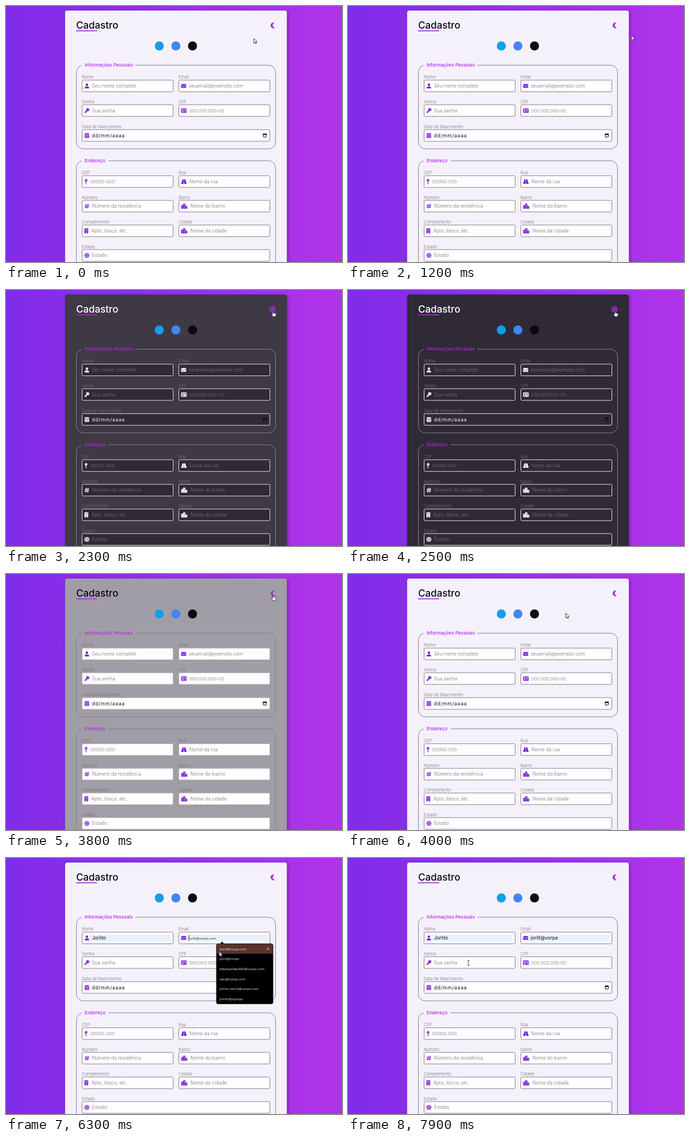
Animation of 594x452 px, one loop 8 s. Source, as an HTML page with a canvas:

```html
<!DOCTYPE html>
<html lang="pt-BR">
<head>
<meta charset="utf-8">
<title>Cadastro</title>
<style>
html, body { margin: 0; width: 100%; height: 100%; overflow: hidden; }
canvas { display: block; width: 594px; height: 452px; }
</style>
</head>
<body>
<canvas id="stage" width="594" height="452"></canvas>
<script>
const c = document.getElementById('stage').getContext('2d');
const LOOP = 8000, STEP = 100;
const DARK_AT = 2100, LIGHT_AT = 3700, FADE = 300;
const UI = 'Inter, sans-serif', SYSTEM = '"Open Sans", sans-serif';
const PURPLE = '#7a1fd8', PINK = '#ae28e0', GRAY = '#757079';
const NAME = 'Jorlito';
const MAILS = ['jorlit@vorpe.com', 'jorlit@vorpe', 'bibalxandes482@vorpe.com',
  'xqu@vorpe.com', 'jorlito.tavim@vorpe.com', 'jorlito@xqzrpp'];

// id, label, placeholder, left, width, middle, icon offset, text offset
const FIELDS = [
  ['user', 'Nome', 'Seu nome completo', 134, 162, 141.2, 9, 18],
  ['mail', 'Email', 'seuemail@exemplo.com', 305, 162, 141.2, 9, 18],
  ['key', 'Senha', 'Sua senha', 134, 162, 184.6, 9, 18],
  ['card', 'CPF', '000.000.000-00', 305, 162, 184.6, 9.5, 19],
  ['date', 'Data de Nascimento', 'dd/mm/aaaa', 134, 333, 228.6, 9, 18],
  ['pin', 'CEP', '00000-000', 134, 162, 310, 7.5, 15],
  ['road', 'Rua', 'Nome da rua', 305, 162, 310, 9.5, 19],
  ['hash', 'Número', 'Número da residência', 134, 162, 353.4, 9, 18],
  ['city', 'Bairro', 'Nome do bairro', 305, 162, 353.4, 10, 21],
  ['tower', 'Complemento', 'Apto, bloco, etc.', 134, 162, 397, 8, 17],
  ['city', 'Cidade', 'Nome da cidade', 305, 162, 397, 10, 21],
  ['globe', 'Estado', 'Estado', 134, 333, 440.4, 9, 18]
];

// Pointer path: time, x, y, shape
const PATH = [
  [0, 438, 57, arrow], [500, 438, 57, arrow], [700, 485, 92, arrow], [900, 555, 111, arrow],
  [1100, 528, 70, arrow], [1300, 474, 34, hand], [1400, 472, 37, hand], [3800, 472, 37, hand],
  [3900, 432, 51, arrow], [4000, 385, 69, arrow], [4300, 240, 121, arrow], [4500, 217, 142, beam],
  [4600, 218, 143, beam], [4800, 218, 143, beam], [4900, 220, 153, arrow], [5000, 222, 157, arrow],
  [5200, 222, 157, arrow], [5300, 225, 176, arrow], [5400, 225, 176, arrow], [5700, 343, 142, beam],
  [5900, 343, 142, beam], [6000, 352, 153, arrow], [6200, 377, 165, arrow], [6300, 377, 165, arrow],
  [6500, 388, 178, arrow], [6600, 388, 178, arrow], [7000, 318, 192, arrow], [7300, 230, 186, beam],
  [7400, 217, 185, beam], [7500, 217, 185, beam], [7700, 212, 185, beam], [7900, 213, 185, beam],
  [8000, 213, 185, beam]
];

function mix(a, b, p) {
  return `rgb(${a.map((v, i) => Math.round(v + (b[i] - v) * p))})`;
}

// CSS "ease" curve, solved by bisection
function ease(x) {
  if (x <= 0 || x >= 1) return Math.min(1, Math.max(0, x));
  const bez = (s, a, b) => 3 * s * (1 - s) ** 2 * a + 3 * s * s * (1 - s) * b + s ** 3;
  let lo = 0, hi = 1;
  for (let i = 0; i < 20; i++) {
    const mid = (lo + hi) / 2;
    if (bez(mid, .25, .25) < x) lo = mid; else hi = mid;
  }
  return bez(lo, .1, 1);
}

function box(x, y, w, h, r, fill, stroke) {
  c.beginPath();
  c.roundRect(x, y, w, h, r);
  if (fill) { c.fillStyle = fill; c.fill(); }
  if (stroke) { c.strokeStyle = stroke; c.stroke(); }
}

function disc(x, y, r, fill) {
  c.beginPath();
  c.arc(x, y, r, 0, 7);
  c.fillStyle = fill;
  c.fill();
}

function line(points, color, width = 1) {
  c.beginPath();
  points.forEach(([x, y]) => c.lineTo(x, y));
  c.strokeStyle = color;
  c.lineWidth = width;
  c.stroke();
  c.lineWidth = 1;
}

function shape(points, fill, stroke, width = .9) {
  c.beginPath();
  points.forEach(([x, y]) => c.lineTo(x, y));
  c.closePath();
  c.fillStyle = fill;
  c.fill();
  if (stroke) {
    c.strokeStyle = stroke;
    c.lineWidth = width;
    c.stroke();
    c.lineWidth = 1;
  }
}

function text(s, x, y, size, color, weight = 400, family = UI, gap = 0) {
  c.font = `${weight} ${size}px ${family}`;
  c.letterSpacing = gap + 'px';
  c.fillStyle = color;
  c.fillText(s, x, y);
}

function grid(xs, ys, w, h, fill) {
  c.fillStyle = fill;
  for (const x of xs) for (const y of ys) c.fillRect(x, y, w, h);
}

// Each icon is centred on the origin; bg cuts holes
const ICONS = {
  user(ink) {
    disc(0, -2.2, 2.2, ink);
    box(-3.9, .7, 7.8, 3.6, [3, 3, .6, .6], ink);
  },
  mail(ink, bg) {
    box(-4.5, -3.4, 9, 6.8, 1, ink);
    line([[-4.6, -2], [0, 1.2], [4.6, -2]], bg, .8);
  },
  key(ink, bg) {
    disc(1.6, -1.6, 2.8, ink);
    line([[.4, -.4], [-3.8, 3.8]], ink, 2);
    line([[-2.4, 3.6], [-.6, 2]], ink, 1.2);
    disc(2.4, -2.4, .8, bg);
  },
  card(ink, bg) {
    box(-5, -3.8, 10, 7.6, 1, ink);
    grid([-5], [-2.4], 10, .6, bg);
    disc(-2, -.3, 1.1, bg);
    box(-3.8, 1.3, 3.6, 1.2, .6, bg);
    grid([1], [-.9, .9], 3, .8, bg);
  },
  date(ink, bg) {
    box(-4, -3.3, 8, 7.8, 1, ink);
    grid([-2.4, 1.2], [-4.6], 1.2, 2, ink);
    grid([-4], [-1.4], 8, .7, bg);
    grid([-2.8, -.6, 1.6], [.3, 2.3], 1.2, 1, bg);
  },
  pin(ink, bg) {
    disc(0, -2.2, 2.3, ink);
    grid([-.6], [0], 1.2, 4.6, ink);
    disc(-.7, -2.8, .6, bg);
  },
  road(ink, bg) {
    shape([[-2.4, -4], [2.4, -4], [5, 4], [-5, 4]], ink);
    grid([-.5], [-4, -1, 2], 1, 2, bg);
  },
  hash(ink) {
    line([[-1, -4], [-2.2, 4]], ink, 1.2);
    line([[2.2, -4], [1, 4]], ink, 1.2);
    line([[-3.6, -1.5], [4, -1.5]], ink, 1.2);
    line([[-4, 1.6], [3.6, 1.6]], ink, 1.2);
  },
  tower(ink, bg) {
    box(-3.3, -4.5, 6.6, 9, .8, ink);
    grid([-1.8, .6], [-3, -.6], 1.2, 1.2, bg);
    grid([-.8], [2.4], 1.6, 2.1, bg);
  },
  city(ink, bg) {
    box(-5.5, -2, 4, 6.4, .6, ink);
    box(-1.9, -4.4, 4, 8.8, .6, ink);
    box(1.6, -.4, 3.9, 4.8, .6, ink);
    grid([-4.4], [-.6, 1.6], 1.1, 1.1, bg);
    grid([-.4], [-2.8, -.6, 1.6], 1.1, 1.1, bg);
    grid([3.1], [1.2], 1.1, 1.1, bg);
  },
  globe(ink, bg) {
    disc(0, 0, 4.4, ink);
    line([[-4.4, -1.5], [4.4, -1.5]], bg, .6);
    line([[-4.4, 1.5], [4.4, 1.5]], bg, .6);
    c.beginPath();
    c.ellipse(0, 0, 2, 4.4, 0, 0, 7);
    c.strokeStyle = bg;
    c.lineWidth = .6;
    c.stroke();
    c.lineWidth = 1;
  }
};

function arrow() {
  shape([[0, 0], [0, 8.6], [2, 6.9], [3.4, 9.8], [4.7, 9.2], [3.4, 6.4], [5.9, 6.2]], '#fff', '#2b2730');
}

function hand() {
  shape([[-.8, 0], [.6, 0], [.8, 3.4], [4.6, 4.2], [5.6, 5.2], [5.3, 7.8], [4.4, 10],
    [0, 10], [-2.8, 6.4], [-2.2, 5.4], [-.8, 6.4]], '#fff', '#2b2730');
  line([[2.2, 6], [2.2, 8]], '#77727d', .5);
  line([[3.6, 6], [3.6, 8]], '#77727d', .5);
}

function beam() {
  line([[0, -3.6], [0, 4]], '#333', .9);
  for (const y of [-4, 4.4]) line([[-2, y], [2, y]], '#333', .8);
}

function at(x, y, draw) {
  c.save();
  c.translate(x, y);
  draw();
  c.restore();
}

function themeIcon(dark, panel) {
  if (dark) {
    const star = Array.from({ length: 16 }, (_, i) => {
      const r = i % 2 ? 4.5 : 6.3, a = i * Math.PI / 8;
      return [r * Math.cos(a), r * Math.sin(a)];
    });
    at(471, 34.2, () => {
      shape(star, PINK);
      disc(0, 0, 3.1, panel);
      disc(0, 0, 2.2, PINK);
    });
    return;
  }
  c.beginPath();
  c.arc(473, 34.2, 5.2, -1.25, 1.05, true);
  c.quadraticCurveTo(471.2, 37.6, 471.6, 33.4);
  c.quadraticCurveTo(472, 30.6, 474.6, 29.3);
  c.fillStyle = '#ac2be2';
  c.fill();
}

function fieldset(y, h, title, gapEnd) {
  c.save();
  c.beginPath();
  c.rect(0, 0, 134, 452);
  c.rect(gapEnd, 0, 594, 452);
  c.rect(134, y + 10, gapEnd - 134, 452);
  c.clip();
  box(124.5, y, 352, h, 12, null, '#85808c');
  c.restore();
  text(title, 139, y + 2.9, 8.1, PINK, 500);
}

// What an input shows instead of its placeholder
function valueOf(id, t) {
  if (id === 'user') {
    if (t >= 5300) return { s: NAME };
    if (t >= 5000) return { s: NAME, preview: true };
  }
  if (id === 'mail') {
    if (t >= 6700) return { s: MAILS[1] };
    if (t >= 6500) return { s: MAILS[1], preview: true };
    if (t >= 6100) return { s: MAILS[0], preview: true };
  }
  return null;
}

function field([id, label, hint, x, w, mid, iconX, textX], t, dark, fade) {
  const bg = dark ? '#2f2a36' : '#fefdff';
  const ink = dark ? '#fff' : PURPLE;
  const base = mid + 3;
  text(label, x, mid - 12.9, 7.4, GRAY, 300);
  box(x + .5, mid - 10.3, w - 1, 20.6, 2, bg, mix([133, 129, 138], [228, 226, 231], fade));
  const value = valueOf(id, t);
  if (value) {
    c.fillStyle = '#e8f0fe';
    c.fillRect(x + 14, mid - 6, w - 19, 12);
  }
  at(x + iconX, mid, () => ICONS[id](ink, bg));
  if (value && value.preview) text(value.s, x + textX, mid + 2.3, 6.1, '#222', 400, SYSTEM);
  else if (value) text(value.s, x + textX, base, 8.4, '#0c0a10');
  else if (id === 'date') text(hint, x + textX, base, 8.4, dark ? '#fff' : '#0c0a10', 400, UI, .85);
  else text(hint, x + textX, base, /^0/.test(hint) ? 8 : 8.45, '#757575', 300);
  if (id === 'date') {
    box(454.7, mid - 2.4, 5.6, 5.2, .5, null, '#0c0a10');
    grid([454.2], [mid - 2.9], 6.6, 2, '#0c0a10');
    grid([455.2, 458.8], [mid - 3.8], 1, 1.2, '#0c0a10');
  }
}

function caret(t) {
  const onName = t >= 4800 && t < 5300, onMail = t >= 5900 && t < 6700;
  if (!onName && !onMail) return;
  if ((t - (onName ? 4800 : 5900)) % 1000 >= 500) return;
  const x = onName ? 152 : 323.5;
  line([[x, 136], [x, 146.5]], '#111', .8);
}

function dropdown(x, rows, active) {
  const top = 151.4, pitch = 17.7;
  shape([[x + 6, top + .5], [x + 10, top - 4], [x + 14, top + .5]], '#000');
  box(x, top, 100, rows.length * pitch, 3, '#000', '#2a2020');
  rows.forEach((s, i) => {
    const y = top + i * pitch, mid = y + 9;
    if (i === active) {
      const r = [i ? 0 : 3, i ? 0 : 3, 0, 0];
      box(x + .5, y + .5, 99, pitch - .5, r, '#58342d');
      line([[x + 89, mid - 2], [x + 93, mid + 2]], '#eee', .8);
      line([[x + 93, mid - 2], [x + 89, mid + 2]], '#eee', .8);
    }
    text(s, x + 5.5, mid + 2.1, 6, '#ececec', 400, SYSTEM);
  });
}

function pointer(t) {
  let i = 0;
  while (i < PATH.length - 2 && PATH[i + 1][0] <= t) i++;
  const [t0, x0, y0, draw] = PATH[i], [t1, x1, y1] = PATH[i + 1];
  const p = (t - t0) / (t1 - t0);
  at(x0 + (x1 - x0) * p, y0 + (y1 - y0) * p, draw);
}

function render(t) {
  const dark = t >= DARK_AT && t < LIGHT_AT;
  const fade = ease((t - DARK_AT) / FADE) - ease((t - LIGHT_AT) / FADE);
  const panel = mix([245, 241, 251], [47, 42, 54], fade);

  const sky = c.createLinearGradient(0, 0, 594, 0);
  sky.addColorStop(0, '#802ce9');
  sky.addColorStop(1, '#b034e9');
  c.fillStyle = sky;
  c.fillRect(0, 0, 594, 452);

  c.save();
  c.shadowColor = 'rgba(0,0,0,.3)';
  c.shadowBlur = 6;
  c.shadowOffsetX = c.shadowOffsetY = 2;
  box(104.5, 8, 392, 480, 4, panel);
  c.restore();

  text('Cadastro', 124, 40.2, 17.2, dark ? '#fff' : '#0c0a10', 500);
  const rule = c.createLinearGradient(124, 0, 161, 0);
  rule.addColorStop(0, '#8a2be2');
  rule.addColorStop(1, '#b52be2');
  c.fillStyle = rule;
  c.fillRect(124, 43, 37, 1.6);

  themeIcon(dark, panel);
  disc(271, 70.5, 8, '#119fe6');
  disc(300.3, 70.5, 8, '#4285f4');
  disc(329.7, 70.5, 8, '#0c0a10');

  fieldset(104.5, 147.7, 'Informações Pessoais', 228.5);
  fieldset(273.3, 240, 'Endereço', 181);
  FIELDS.forEach(f => field(f, t, dark, fade));
  caret(t);

  if (t >= 4800 && t < 5300) dropdown(177, [NAME], t >= 5000 ? 0 : -1);
  if (t >= 5900 && t < 6700) dropdown(372, MAILS, t >= 6500 ? 1 : t >= 6100 ? 0 : -1);
  pointer(t);
}

const start = performance.now();
function tick() {
  const t = Math.max(0, performance.now() - start) % LOOP;
  render(Math.floor(t / STEP) * STEP);
  requestAnimationFrame(tick);
}
tick();
</script>
</body>
</html>
```
